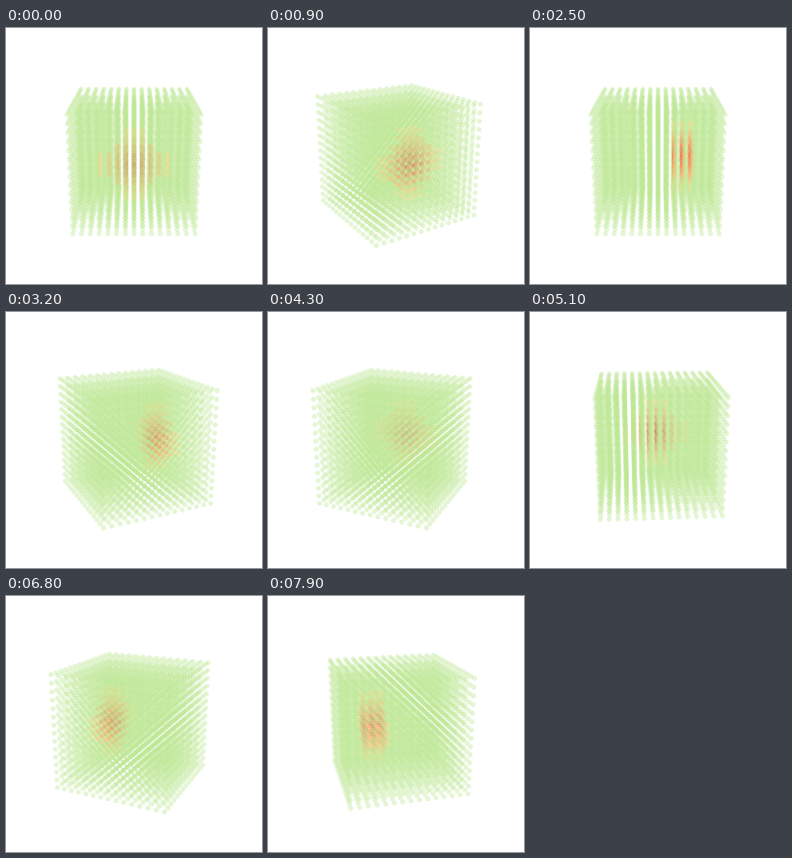
A matplotlib script for the animation above (8 s loop, 256 by 256 pixels).

```python
import numpy as np
import matplotlib.pyplot as plt
from matplotlib.animation import FuncAnimation
from matplotlib.colors import LinearSegmentedColormap

SIZE, DPI = 256, 100
FRAMES, INTERVAL = 80, 100
STEP = 3.6                      # degrees turned per frame
N = 15                          # beads along each side of the cube
FOCAL, DIST = 477.7, 4.214      # camera, in pixels and cube sides
ELEV = np.radians(19)
BEAD = 0.0205                   # bead radius in cube sides

GREEN = (0.74, 0.91, 0.575, 0.38)
HEAT = LinearSegmentedColormap.from_list(
    "heat", ["#fde08c", "#fcbf78", "#f68d5c", "#e0503c"])


def make_lattice():
    i, j, k = (g.ravel() for g in np.indices((N, N, N)))
    points = np.stack([i, j, k], axis=1) / (N - 1) - 0.5

    # The hot spot is a thick cross standing in front of the centre.
    dx, dy, dz = abs(i - 10), abs(j - 7), abs(k - 7)
    low, high = np.minimum(dy, dz), np.maximum(dy, dz)
    hot = (dx <= 1) & (((low <= 1) & (high <= 4)) | (high <= 2))

    dist = np.sqrt(dx**2 + dy**2 + dz**2)
    heat = np.clip(1.12 - dist / 4.2, 0, 1)
    colors = np.tile(GREEN, (len(points), 1))
    colors[hot] = HEAT(heat[hot])
    colors[hot, 3] = 0.42 + 0.2 * heat[hot]
    return points, colors


def project(points, angle):
    """Return screen x, y, and pixels per cube side for each point."""
    x, y, z = points.T
    c, s = np.cos(angle), np.sin(angle)
    near = x * c - y * s
    right = x * s + y * c
    ce, se = np.cos(ELEV), np.sin(ELEV)
    scale = FOCAL / (DIST - near * ce - z * se)
    up = z * ce - near * se
    return SIZE / 2 + right * scale, SIZE / 2 + up * scale, scale


points, colors = make_lattice()

fig = plt.figure(figsize=(SIZE / DPI, SIZE / DPI), dpi=DPI, facecolor="white")
ax = fig.add_axes([0, 0, 1, 1])
ax.set(xlim=(0, SIZE), ylim=(0, SIZE))
ax.axis("off")
beads = ax.scatter(points[:, 0], points[:, 1], linewidths=0)


def update(frame):
    x, y, scale = project(points, np.radians(STEP * frame))
    order = np.argsort(scale, kind="stable")
    beads.set_offsets(np.column_stack([x, y])[order])
    beads.set_sizes((2 * BEAD * scale[order] * 72 / DPI) ** 2, dpi=DPI)
    beads.set_facecolors(colors[order])
    return (beads,)


anim = FuncAnimation(fig, update, frames=FRAMES, interval=INTERVAL,
                     repeat=True, repeat_delay=0)
plt.show()
```
